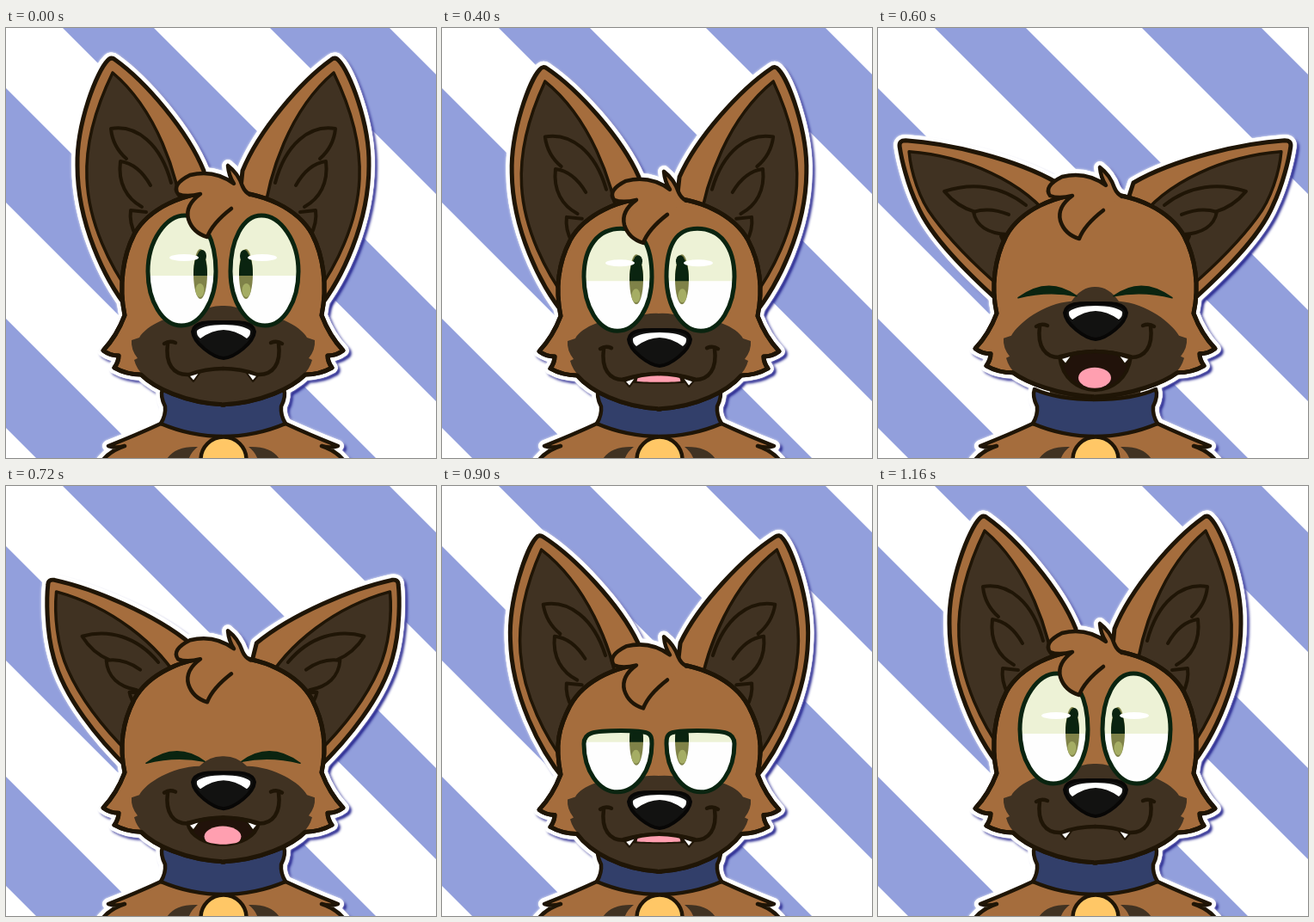
Animation of 500x500 px, one loop 1.18 s. Source, as an HTML page with a canvas:

```html
<!DOCTYPE html>
<html lang="en">
<head>
<meta charset="utf-8">
<title>Laughing dog</title>
<style>
html, body { margin: 0; height: 100%; overflow: hidden; }
canvas { display: block; width: 100vw; height: 100vh; }
</style>
</head>
<body>
<canvas id="stage" width="500" height="500"></canvas>
<script>
const ctx = document.getElementById('stage').getContext('2d');
const LOOP = 1180, MID = 252.5;
const FUR = '#a56d3d', DARK = '#403222', INK = '#1f1506', LID = '#0a2410';

// Pose tracks, one value per key time
const times = [0, 300, 480, 560, 600, 820, 980, 1100, 1160];
const tracks = {
  ear:   [0, -.05, .23, 1.04, 1, .46, -.14, -.03, 0],
  top:   [0, 3, 9, 2, 2, 14, 16, 4, 0],
  nose:  [0, 5, 11, -18, -22, 6, 18, 3, 0],
  chin:  [0, 3, 6, -7, -9, 7, 12, 2, 0],
  mouth: [0, 4, 7, -16, -20, 1, 13, 2, 0],
  open:  [0, 0, .27, .9, 1, .27, 0, 0, 0],
  blink: [0, 0, .24, 1, 1, 1, .04, 0, 0]
};

// Monotone cubic interpolation
function sample(v, t) {
  const last = times.length - 1;
  if (t >= times[last]) return v[last];
  const i = times.findIndex((key, j) => t < times[j + 1]);
  const rate = j => j < 0 || j >= last ? 0 : (v[j + 1] - v[j]) / (times[j + 1] - times[j]);
  const slope = j => {
    const a = rate(j - 1), b = rate(j);
    return a * b > 0 ? 2 * a * b / (a + b) : 0;
  };
  const d = times[i + 1] - times[i], u = (t - times[i]) / d, w = 1 - u;
  return v[i] * (1 + 2 * u) * w * w + slope(i) * d * u * w * w
    + v[i + 1] * u * u * (3 - 2 * u) - slope(i + 1) * d * u * u * w;
}

// Blend two paths that have the same commands; y follows a slight arc
function mix(a, b, k) {
  const to = b.match(/-?[\d.]+/g);
  let i = 0;
  return a.replace(/-?[\d.]+/g, n => {
    const f = i % 2 ? k - .25 * k * (1 - k) : k;
    return +n + (to[i++] - n) * f;
  });
}

const ear = {
  shell: ['M143 328C114 292 83 226 83 160C82 110 106 50 118 38Q122 33 127 37C162 62 211 119 230 166L235 215',
          'M143 318C105 284 62 242 46 205C34 180 27 150 25 136Q24 129 32 129C80 132 160 150 208 178L220 215'],
  inside: ['M124 52C108 85 92 130 94 175C96 228 122 278 145 310L206 225C200 170 175 95 124 52',
           'M36 142C38 165 48 198 64 218C84 245 113 274 143 300L205 225C170 175 100 147 36 142'],
  tufts: ['M192 180C180 135 152 112 122 117Q124 138 140 152M168 183Q154 158 133 155C130 180 140 198 158 208M163 214L145 212Q143 226 151 242',
          'M172 204C142 180 108 178 77 188Q92 206 113 212M152 215Q130 206 111 212C114 228 128 237 150 238M160 240L143 240Q146 248 154 254']
};

const body = 'M254 470L180 460Q152 473 119 486Q129 489 138 486Q122 491 112 503L254 503';
const collar = 'M254 432Q208 432 182 420Q179 428 185 440Q186 450 180 460Q215 475 254 475';
const neck = 'M200 400V432L254 436V400';
const chest = 'M186 503Q195 486 223 487Q214 494 212 503';
const hair = 'M284 194Q278 191 275 184Q270 169 258 160Q259 172 265 181Q242 164 214 171Q192 182 200 193Q210 197 226 193Q208 206 212 222Q217 238 234 243Q240 227 262 210';

function shape(path, fill, stroke, width = 4.5) {
  const p = new Path2D(path);
  if (fill) { ctx.fillStyle = fill; ctx.fill(p); }
  if (stroke) { ctx.strokeStyle = stroke; ctx.lineWidth = width; ctx.stroke(p); }
}

function ellipse(x, y, rx, ry, fill, stroke) {
  ctx.beginPath();
  ctx.ellipse(x, y, rx, ry, 0, 0, 2 * Math.PI);
  ctx.fillStyle = fill;
  ctx.fill();
  if (stroke) { ctx.strokeStyle = stroke; ctx.lineWidth = 4.5; ctx.stroke(); }
}

function layer(draw, dy = 0) {
  ctx.save();
  ctx.translate(0, dy);
  draw();
  ctx.restore();
}

function mirrored(draw, dy) {
  layer(draw, dy);
  layer(() => {
    ctx.translate(2 * MID, 0);
    ctx.scale(-1, 1);
    draw();
  }, dy);
}

function background() {
  ctx.fillStyle = '#fff';
  ctx.fillRect(0, 0, 500, 500);
  for (const [a, b] of [[-465, -338], [-203, -70], [66, 172], [307, 446]])
    shape(`M${a} 0H${b}l500 500H${a + 500}Z`, '#929fdc');
}

function drawEye(p) {
  const shift = .7 * p.nose, cy = 283 + shift, bottom = 346 + shift;
  const lidY = 327 + .65 * p.nose;
  if (p.blink > .9) {
    shape(`M163 ${lidY + 1}Q198 ${lidY - 25} 231 ${lidY - 1}Q198 ${lidY - 8} 163 ${lidY + 1}`, LID, LID, 1.5);
    return;
  }
  const top = 218 + shift + (lidY - 218 - shift) * p.blink;
  const mid = Math.max(cy, top + 32 * (1 - p.blink));
  const k = .55 + Math.min(.3, p.blink * 1.1);
  const upper = mid + (top - mid) * k, lower = mid + (bottom - mid) * .55;
  const outline = `M165 ${mid}C165 ${upper} ${208 - 40 * k} ${top} 208 ${top}S244 ${upper} 244 ${mid}`
    + `C244 ${lower} 226 ${bottom} 204 ${bottom}S165 ${lower} 165 ${mid}Z`;
  layer(() => {
    ctx.clip(new Path2D(outline));
    shape('M150 190H260V400H150Z', '#fefefe');
    const line = cy + 5;
    shape(`M150 190H260V${line}H150Z`, '#edf2d6');
    ellipse(226, cy + 3, 8, 29, '#7f8248');
    ellipse(225.5, cy + 22, 5, 8, '#a5ad64');
    layer(() => {
      ctx.beginPath();
      ctx.rect(150, 150, 110, line - 150);
      ctx.clip();
      ellipse(226, cy + 3, 8, 25, LID);
      ellipse(228, cy - 18, 5, 7, LID);
    });
    ellipse(207, cy - 16, 17, 4, '#fff');
  });
  shape(outline, null, LID, 5);
}

function drawMouth(p) {
  const y = 402 + p.mouth, d = 40 * p.open;
  if (d > 1) {
    const hole = `M211 ${y}Q253 ${y - 12} 294 ${y}C288 ${y + d * 1.3} 217 ${y + d * 1.3} 211 ${y}`;
    shape(hole, '#21120a', INK, 4);
    layer(() => {
      ctx.clip(new Path2D(hole));
      ellipse(252, y + d * .62, 26 - 7 * p.open, 12, '#ff9fb0');
    });
  }
  mirrored(() => {
    shape('M211 403L226 400L218 411Z', '#fff', INK, 2);
    shape('M184 367Q190 363 197 366M188 367C185 390 194 404 213 403Q232 396 253 396', null, INK, 4.5);
  }, p.mouth);
}

function drawNose() {
  shape('M217 353C219 340 240 342 253 342S287 340 289 353C288 366 266 383 253 384C240 383 218 366 217 353Z', '#121211', '#080706', 4);
  shape('M222 352Q230 345 253 345Q276 345 284 352Q285 357 280 361Q266 351 253 351Q240 351 226 361Q221 357 222 352Z', '#fff');
}

function draw(t) {
  const p = {};
  for (const name in tracks) p[name] = sample(tracks[name], t);
  const { top, nose, chin } = p, cheek = .1 * nose;
  const [shell, inside, tufts] = Object.values(ear).map(([up, down]) => mix(up, down, p.ear));
  const jaw = `C172 ${418 + chin * .7} 208 ${436 + chin} 254 ${438 + chin}`;
  const head = `M254 ${190 + top}C205 ${190 + top} 165 ${211 + top} 149 ${240 + top}`
    + `C136 ${265 + top} 131 300 138 ${334 + cheek}Q129 ${358 + cheek} 113 ${375 + cheek}`
    + `Q121 ${381 + cheek} 131 ${381 + cheek}Q131 ${388 + cheek} 126 ${395 + cheek}`
    + `Q140 ${403 + cheek} 157 ${403 + cheek}` + jaw;
  const mask = `M254 ${323 + nose}Q237 ${322 + nose} 225 ${331 + nose * .6}`
    + `C192 ${331 + nose * .5} 163 ${346 + cheek} 155 ${360 + cheek}L146 ${363 + cheek}`
    + `Q145 ${374 + cheek} 153 ${384 + cheek}L149 ${386 + cheek}Q152 ${397 + cheek} 160 ${404 + cheek}` + jaw;

  ctx.lineJoin = ctx.lineCap = 'round';
  background();

  // Sticker border: first with its offset shadow, then with a soft white rim
  for (const [color, x, y] of [['#20208c', 3, 3], ['#fff', 0, 0]]) {
    layer(() => {
      ctx.shadowColor = color;
      ctx.shadowBlur = 3;
      ctx.shadowOffsetX = x;
      ctx.shadowOffsetY = y;
      const border = path => shape(path, '#fff', '#fff', 13.5);
      mirrored(() => [body, collar, head].forEach(border));
      mirrored(() => border(shell), top);
      layer(() => border(hair), top);
    });
  }

  mirrored(() => {
    shape(body, FUR, INK);
    shape(chest, DARK);
    shape(neck, DARK);
  });
  mirrored(() => shape(collar, '#323f6a', INK));
  ellipse(253, 502, 26.5, 26.5, '#ffc766', INK);

  mirrored(() => {
    shape(shell, FUR, INK, 5);
    shape(inside, DARK, INK, 3.5);
    shape(tufts, null, INK, 4);
  }, top);
  mirrored(() => {
    shape(head, FUR, INK, 5);
    shape(mask, DARK);
    shape(head, null, INK, 5);
  });
  mirrored(() => drawEye(p));
  drawMouth(p);
  layer(drawNose, nose);
  layer(() => shape(hair, FUR, INK), top);
}

function tick() {
  draw(performance.now() % LOOP);
  requestAnimationFrame(tick);
}
tick();
</script>
</body>
</html>
```
